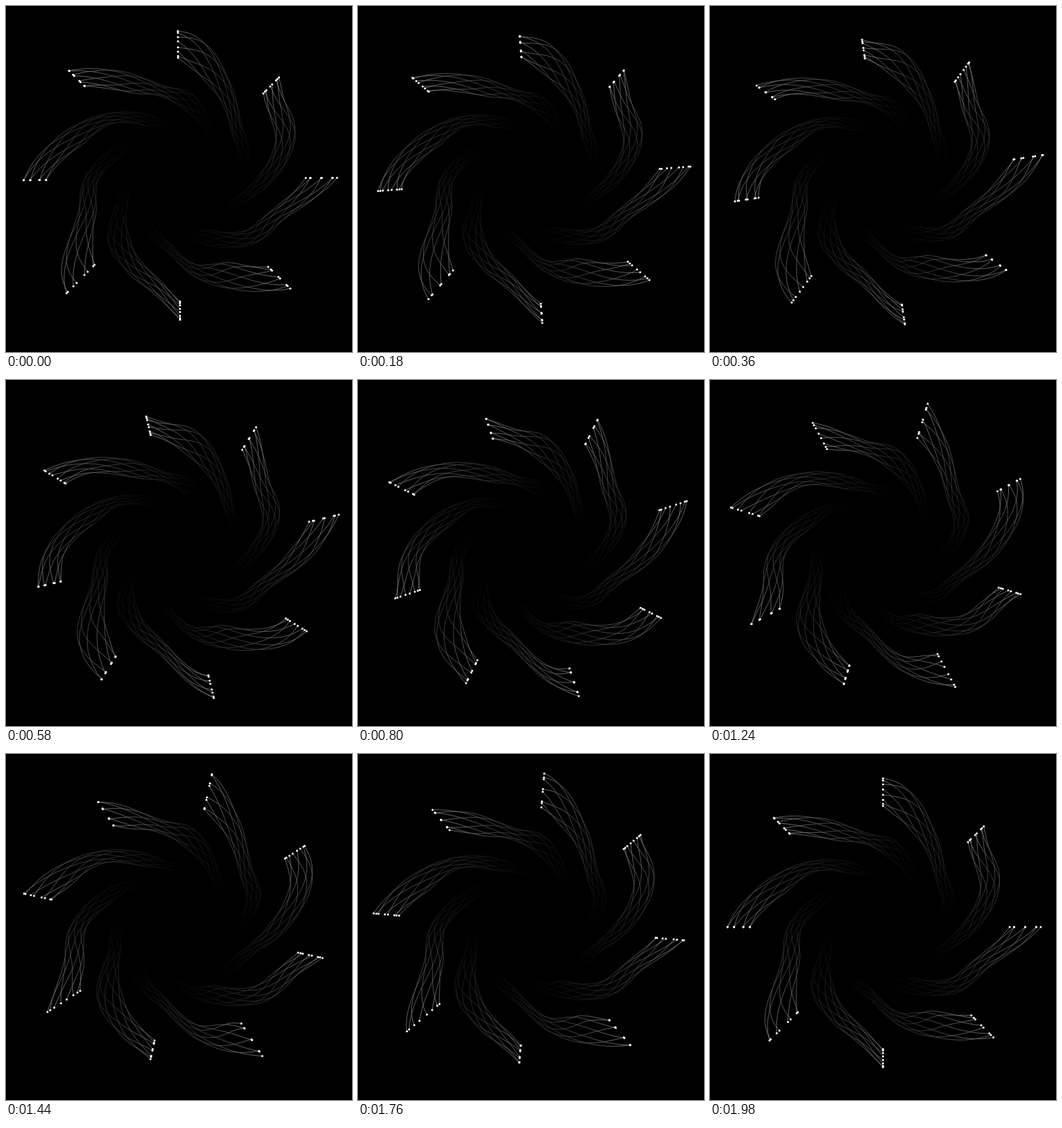
Recreate the animation shown at these times as an HTML page with a canvas. Size 500 by 500 pixels, loop 2000 ms.

```html
<!DOCTYPE html>
<html lang="en">
<head>
<meta charset="utf-8">
<title>Spiral strands</title>
<style>
html, body { margin: 0; width: 100%; height: 100%; overflow: hidden; background: #000; }
canvas { display: block; width: 500px; height: 500px; }
</style>
</head>
<body>
<canvas id="stage" width="500" height="500"></canvas>
<script>
const ctx = document.getElementById('stage').getContext('2d');
const CENTER = 250;
const LOOP = 2000, STEP = 20;
const SECTOR = 45;            // degrees turned per loop
const TURNS = 8;              // the closed path winds this often
const HEADS = TURNS * 360 / SECTOR;
const WAVES = 25;             // weaves along the whole path, odd so that strands stay apart
const DECAY = 91;             // degrees over which a trail shrinks by e
const TAIL = 94, SEG = 0.9;

// Inner and outer edge of the ring of heads, every 20 degrees.
const inner = [183, 195, 175, 175, 173, 176, 171, 194, 185, 191, 168, 172, 174, 168, 183, 165, 184, 174];
const outer = [228, 237, 207, 214, 227, 203, 215, 226, 230, 226, 207, 235, 214, 195, 214, 221, 225, 206];

// Closed Catmull-Rom curve through the points
function curve(points, deg) {
  const n = points.length, u = deg * n / 360, i = Math.floor(u), t = u - i;
  const [a, b, c, d] = [-1, 0, 1, 2].map(k => points[(i + k + 2 * n) % n]);
  return b + 0.5 * t * (c - a + t * (2 * a - 5 * b + 4 * c - d + t * (3 * (b - c) + d - a)));
}

// Each strand weaves between the two edges.
function radius(deg) {
  const weave = 0.5 - 0.5 * Math.cos(2 * Math.PI * WAVES * deg / (360 * TURNS));
  const lo = curve(inner, deg), hi = curve(outer, deg);
  return lo + (hi - lo) * weave;
}

function place(deg, age) {
  const at = deg - age;
  const r = radius(at) * Math.exp(-age / DECAY);
  const a = at * Math.PI / 180;
  return [CENTER + r * Math.cos(a), CENTER - r * Math.sin(a)];
}

function shade(age) {
  const q = Math.exp(-age / DECAY);
  return Math.round(125 * Math.pow(Math.max(0, (q - 0.35) / 0.65), 1.5));
}

function draw(turn) {
  ctx.fillStyle = '#000';
  ctx.fillRect(0, 0, 500, 500);
  ctx.lineWidth = 0.85;

  const heads = Array.from({ length: HEADS }, (_, m) => (m + TURNS) * SECTOR + turn);
  let last = heads.map(h => place(h, TAIL));
  for (let age = TAIL - SEG; age > -SEG; age -= SEG) {
    const at = Math.max(0, age);
    const next = heads.map(h => place(h, at));
    const g = shade(at);
    ctx.strokeStyle = `rgb(${g},${g},${g})`;
    ctx.beginPath();
    next.forEach((p, m) => {
      ctx.moveTo(...last[m]);
      ctx.lineTo(...p);
    });
    ctx.stroke();
    last = next;
  }

  ctx.fillStyle = '#fff';
  for (const h of heads) {
    ctx.beginPath();
    ctx.arc(...place(h, 0), 1.5, 0, 2 * Math.PI);
    ctx.fill();
  }
}

function tick() {
  const n = Math.floor((performance.now() % LOOP) / STEP);
  draw(SECTOR * (n + 1) * STEP / LOOP);
  requestAnimationFrame(tick);
}
tick();
</script>
</body>
</html>
```
